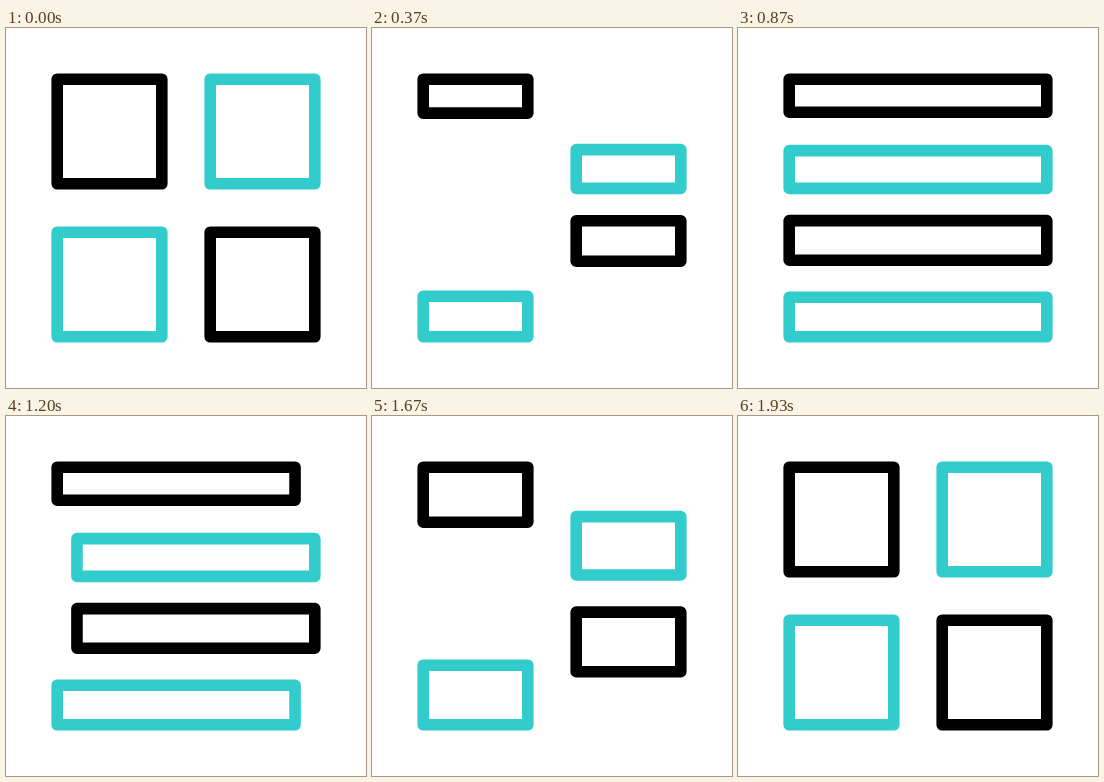
An HTML page that plays this animation: 360 by 360 pixels, repeating every 2000 ms.

```html
<!DOCTYPE html>
<html lang="en">
<head>
<meta charset="utf-8">
<title>Grid to list</title>
<style>
html, body { margin: 0; width: 100%; height: 100%; overflow: hidden; background: #fff; }
svg { display: block; width: 100vw; height: 100vh; }
rect { fill: none; stroke-width: 11.6; stroke-linejoin: round; }
</style>
</head>
<body>
<svg id="stage" viewBox="0 0 360 360"></svg>
<script>
const LOOP = 2000, FPS = 30;
const BLACK = '#000', TEAL = '#33cccc';
const NEAR = 51.2, FAR = 308.8, SIDE = 104.6;

// x: left edge as a tile and as a bar; y: top and bottom edges as a tile and as a bar
const boxes = [
  { color: BLACK, x: [NEAR, NEAR], top: [NEAR, NEAR], bottom: [NEAR + SIDE, 84.2] },
  { color: TEAL, x: [FAR - SIDE, NEAR], top: [NEAR, 122.6], bottom: [NEAR + SIDE, 160.4] },
  { color: TEAL, x: [NEAR, NEAR], top: [FAR - SIDE, 269.2], bottom: [FAR, FAR] },
  { color: BLACK, x: [FAR - SIDE, NEAR], top: [FAR - SIDE, 192.6], bottom: [FAR, 232.2] }
];

const stage = document.getElementById('stage');
for (const box of boxes) {
  box.el = document.createElementNS('http://www.w3.org/2000/svg', 'rect');
  box.el.setAttribute('stroke', box.color);
  stage.appendChild(box.el);
}

const mix = ([a, b], k) => a + (b - a) * k;

// cubic-bezier(.42, 0, .58, 1)
function ease(x) {
  if (x <= 0) return 0;
  if (x >= 1) return 1;
  let lo = 0, hi = 1;
  const bezier = (s, a, b) => 3 * (1 - s) * s * ((1 - s) * a + s * b) + s ** 3;
  for (let i = 0; i < 24; i++) {
    const mid = (lo + hi) / 2;
    if (bezier(mid, 0.42, 0.58) < x) lo = mid; else hi = mid;
  }
  return bezier(lo, 0, 1);
}

const span = (tick, from, to) => ease((tick - from) / (to - from));

function draw(ms) {
  const tick = Math.floor(ms % LOOP * FPS / 1000 + 0.11);
  const flat = span(tick, 0, 12) - span(tick, 45, 58);
  const wide = span(tick, 12, 26) - span(tick, 33, 45);
  for (const { el, x, top, bottom } of boxes) {
    const y = mix(top, flat);
    el.setAttribute('x', mix(x, wide));
    el.setAttribute('y', y);
    el.setAttribute('width', mix([SIDE, FAR - NEAR], wide));
    el.setAttribute('height', mix(bottom, flat) - y);
  }
}

const start = performance.now();
function loop() {
  draw(performance.now() - start);
  requestAnimationFrame(loop);
}
loop();
</script>
</body>
</html>
```
